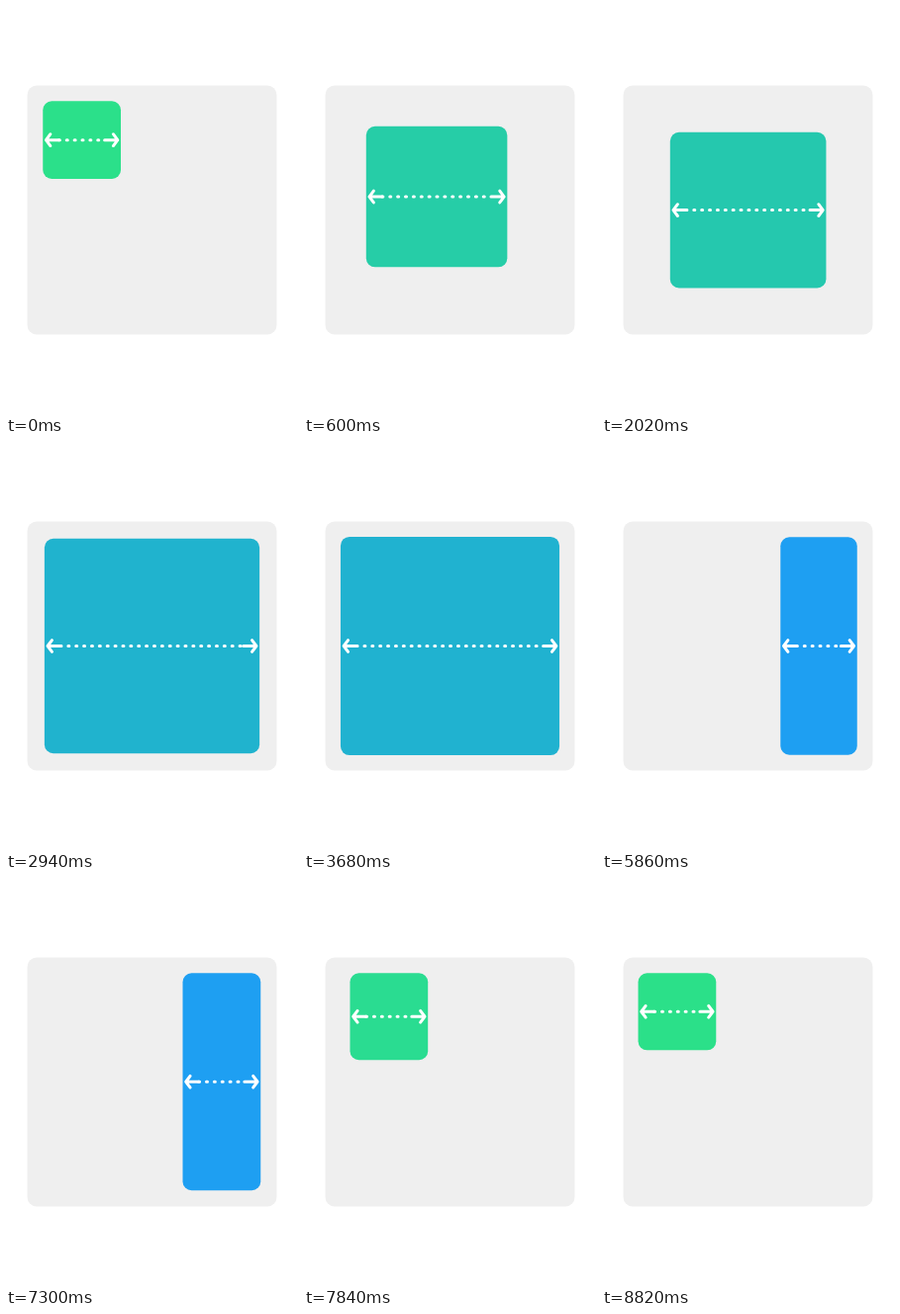
These frames come from a looping animation (295x413 px, 8.84 s). An HTML page:

```html
<!DOCTYPE html>
<html lang="en">
<head>
<meta charset="utf-8">
<title>Resizing box</title>
<style>
  html, body { margin: 0; width: 100%; height: 100%; overflow: hidden; background: #fff; }
  svg { display: block; width: 100%; height: 100%; }
  #arrows { fill: none; stroke: #fff; stroke-width: 3; stroke-linecap: round; stroke-linejoin: round; }
  #dots { stroke-dasharray: 1 6.875; }
</style>
</head>
<body>
<svg viewBox="0 0 295 413">
  <rect x="21.5" y="80.5" width="252" height="252" rx="9.5" fill="#efefef"/>
  <rect id="box" rx="9"/>
  <g id="arrows">
    <path id="left" d="M7.6 -5.9L3.2 0L7.6 5.9M3.2 0H16.4"/>
    <path id="right" d="M-7.6 -5.9L-3.2 0L-7.6 5.9M-3.2 0H-16.4"/>
    <path id="dots"/>
  </g>
</svg>
<script>
  const LOOP = 8840, STEP = 20, DURATION = 2000;
  const UNIT = 15.75, ORIGIN = [21.5, 80.5];

  // x, y, width, height in grid units, then the fill as r, g, b
  const poses = [
    [1, 1, 5, 5, 43, 224, 138],
    [3, 3, 10, 10, 37, 200, 174],
    [1, 1, 14, 14, 32, 178, 208],
    [10, 1, 5, 14, 30, 159, 242]
  ];
  const starts = [222, 2370, 5033, 7299];

  const [box, left, right, dots] =
    ['box', 'left', 'right', 'dots'].map(id => document.getElementById(id));

  const elastic = p =>
    p >= 1 ? 1 : 1 - 2 ** (-10 * p) * Math.cos(2 * Math.PI * p / 1.5);

  function poseAt(time) {
    const i = starts.filter(s => s <= time).length - 1;
    if (i < 0) return poses[0];
    const k = elastic((time - starts[i]) / DURATION);
    const to = poses[(i + 1) % poses.length];
    return poses[i].map((v, n) => v + (to[n] - v) * k);
  }

  function draw(time) {
    const [gx, gy, gw, gh, ...rgb] = poseAt(time);
    const x = ORIGIN[0] + gx * UNIT, y = ORIGIN[1] + gy * UNIT;
    const width = gw * UNIT, height = gh * UNIT;
    const mid = y + height / 2;

    for (const [name, value] of Object.entries({ x, y, width, height }))
      box.setAttribute(name, value);
    box.setAttribute('fill', `rgb(${rgb.map(Math.round)})`);
    left.setAttribute('transform', `translate(${x} ${mid})`);
    right.setAttribute('transform', `translate(${x + width} ${mid})`);
    dots.setAttribute('d', `M${x + 16.1} ${mid}H${x + width - 16.4}`);
  }

  const origin = performance.now();
  function tick() {
    const time = (performance.now() - origin) % LOOP;
    draw(Math.floor(time / STEP) * STEP);
    requestAnimationFrame(tick);
  }
  tick();
</script>
</body>
</html>
```
